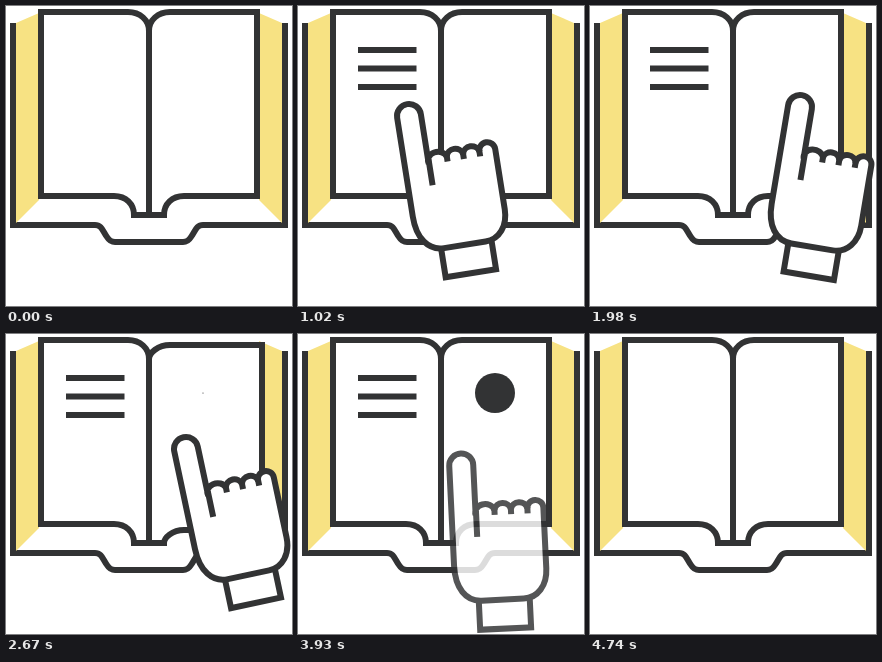
An HTML page that plays this animation: 286 px wide and 300 px high, repeating every 5.07 s.

```html
<!DOCTYPE html>
<html lang="en">
<head>
<meta charset="utf-8">
<title>Book and hand</title>
<style>
  html, body { margin: 0; width: 100%; height: 100%; overflow: hidden; background: #fff; }
  svg { display: block; width: 100%; height: 100%; }
  .ink { fill: #fff; stroke: #323334; stroke-width: 6; }
  .line { fill: none; }
  .side { fill: #f7e283; }
  .mark { fill: #323334; }
</style>
</head>
<body>
<svg viewBox="0 0 286 300">
  <path class="ink" d="M7 17V219H89C96 219 97 226 101 231Q104 236 109 236H177Q182 236 185 231C189 226 190 219 197 219H279V17"/>
  <path class="side" d="M10 17L33 7V194L10 217ZM276 17L253 7V194L276 217Z"/>
  <path class="ink" d="M143 25C143 14 134 6 122 6H35V190H108C120 190 128 198 128 209H143"/>
  <path class="ink" id="page"/>
  <path class="ink line" d="M143 22V212M125 209H161"/>
  <g id="content">
    <path class="ink line" id="row0"/>
    <path class="ink line" id="row1"/>
    <path class="ink line" id="row2"/>
    <circle class="mark" id="dot" cx="197" cy="59"/>
  </g>
  <g id="hand">
    <path class="ink" d="M11 132V165H62V132Z"/>
    <path class="ink" d="M12 50V0A12 12 0 0 0 -12 0V100C-12 122 -2 136 14 136H56C70 136 80 124 80 107V46A8 8 0 0 0 64 46A8.4 8 0 0 0 47.5 46A8.4 8 0 0 0 31 46A9.5 8 0 0 0 12 50Z"/>
    <path class="ink line" d="M12.5 46V72M31 45V51M47.5 45V51M64 45V51"/>
  </g>
</svg>
<script>
const LOOP = 5070, STEP = 30;
const $ = id => document.getElementById(id);
const [page, content, dot, hand] = ['page', 'content', 'dot', 'hand'].map($);

// time, x, y, angle, opacity
const handKeys = [
  [90, 162, 140, -4, 0],
  [240, 106, 95, -8, 1],
  [330, 76, 74, -9, 1],
  [480, 111, 73, -9, 1],
  [600, 75, 92, -9, 1],
  [750, 111, 92, -9, 1],
  [840, 73, 110, -9, 1],
  [1020, 111, 110, -9, 1],
  [1140, 137, 108, -6, 1],
  [1410, 182, 103, 1, 1],
  [1680, 202, 102, 5, 1],
  [1980, 210, 101, 9.5, 1],
  [2220, 197, 105, 0, 1],
  [2670, 180, 115, -12, 1],
  [3000, 186, 120, -9, 1],
  [3360, 192, 125, -5.5, 1],
  [3840, 189, 132, -4, 1],
  [4350, 43, 129, 3, 0.04],
  [4470, 43, 129, 3, 0.04],
  [4740, 43, 129, 3, 0]
];
const pageKeys = [[2250, 0], [2670, 1], [3060, 0]];
const dotKeys = [[2640, 0], [2670, 0.6], [3300, 20]];
const fadeKeys = [[4470, 1], [4740, 0]];
const rows = [
  { y: 44, from: 330, to: 480 },
  { y: 62.5, from: 600, to: 750 },
  { y: 81, from: 840, to: 1000 }
];

function sample(keys, t) {
  const i = keys.findIndex(k => k[0] > t);
  if (i === 0) return keys[0].slice(1);
  if (i < 0) return keys[keys.length - 1].slice(1);
  const a = keys[i - 1], b = keys[i];
  const p = (t - a[0]) / (b[0] - a[0]);
  return a.slice(1).map((v, n) => v + (b[n + 1] - v) * p);
}

function drawPage(pull) {
  const top = 6 + 5 * pull, right = 251 + 5 * pull, low = 190 + 6 * pull;
  page.setAttribute('d',
    `M143 25C143 ${top + 8} 152 ${top} 164 ${top}H${right}V${low}H178C166 ${low} 158 ${low + 8} 158 209H143`);
}

function draw(t) {
  const [x, y, angle, opacity] = sample(handKeys, t);
  hand.setAttribute('transform', `translate(${x} ${y}) rotate(${angle})`);
  hand.setAttribute('opacity', opacity);

  rows.forEach((row, i) => {
    const p = Math.min(1, Math.max(0, (t - row.from) / (row.to - row.from)));
    $('row' + i).setAttribute('d', p ? `M60 ${row.y}h${58.5 * p}` : '');
  });

  drawPage(sample(pageKeys, t)[0]);
  dot.setAttribute('r', sample(dotKeys, t)[0]);
  content.setAttribute('opacity', sample(fadeKeys, t)[0]);
}

const start = performance.now();
function tick() {
  const t = (performance.now() - start) % LOOP;
  draw(Math.floor(t / STEP) * STEP);
  requestAnimationFrame(tick);
}
tick();
</script>
</body>
</html>
```
